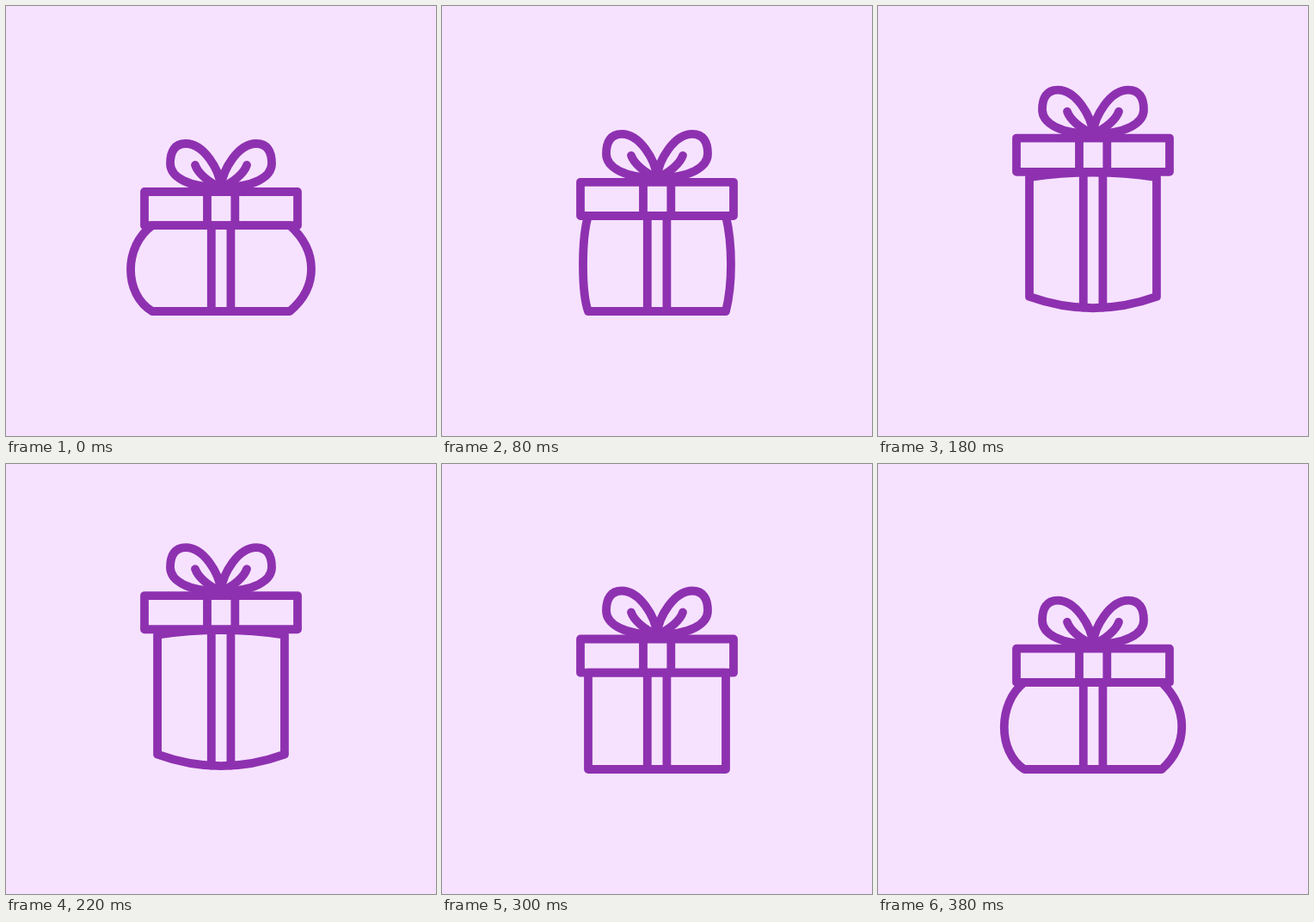
An HTML page with a canvas that plays this animation: 500x500 px, repeating every 400 ms.

```html
<!DOCTYPE html>
<html lang="en">
<head>
<meta charset="utf-8">
<title>Bouncing gift</title>
<style>
  html, body { margin: 0; width: 100%; height: 100%; overflow: hidden; background: #f6e2ff; }
  canvas { display: block; width: 500px; height: 500px; }
</style>
</head>
<body>
<canvas id="stage" width="500" height="500"></canvas>
<script>
const ctx = document.getElementById('stage').getContext('2d');
const LOOP = 400, STEP = 20, CENTER = 250;

// Cubic from 0 to 1 with the given slopes at its ends.
const ease = (t, a, b) =>
  a * t * (1 - t) ** 2 + t * t * (3 - 2 * t) + b * t * t * (t - 1);

// The gift goes squashed -> square -> stretched, then back the same way.
function poseAt(ms) {
  const rising = ms <= LOOP / 2;
  const phase = (rising ? ms : LOOP - ms) / (LOOP / 4);
  const release = Math.min(phase, 1);
  const reach = Math.max(phase - 1, 0);
  const stretch = ease(reach, rising ? 1.35 : 1.65, 0.31);
  return {
    bulge: 25 * (1 - ease(release, 0, 1.06)),
    stretch,
    lidTop: 216 - 12.5 * ease(release, 0, 0) - 55.5 * stretch
  };
}

function stroke(draw) {
  ctx.beginPath();
  draw();
  ctx.stroke();
}

function line(x1, y1, x2, y2) {
  stroke(() => {
    ctx.moveTo(x1, y1);
    ctx.lineTo(x2, y2);
  });
}

function drawBody({ bulge, stretch, lidTop }) {
  const lidBottom = lidTop + 39.2;
  const left = 170 + 6.7 * stretch, right = 500 - left;
  const top = lidBottom + 7 * stretch, topMid = lidBottom + stretch;
  const bottom = 355 - 19 * stretch, bottomMid = 355 - 4.2 * stretch;
  const out = bulge * 4 / 3, height = bottom - top;

  stroke(() => {
    ctx.moveTo(left, top);
    ctx.quadraticCurveTo(CENTER, 2 * topMid - top, right, top);
    ctx.bezierCurveTo(right + out, top + height * 0.3,
                      right + out, bottom - height * 0.28, right, bottom);
    ctx.quadraticCurveTo(CENTER, 2 * bottomMid - bottom, left, bottom);
    ctx.bezierCurveTo(left - out, bottom - height * 0.2,
                      left - out, top + height * 0.24, left, top);
    ctx.closePath();
  });
  line(238.8, topMid, 238.8, bottomMid - 0.5);
  line(261.4, topMid, 261.4, bottomMid - 0.5);
}

function drawLid() {
  ctx.strokeRect(161, 0, 178, 39.2);
  line(234, 0, 234, 39);
  line(266.3, 0, 266.3, 39);
}

function drawBowHalf(side) {
  ctx.save();
  ctx.translate(CENTER, 0);
  ctx.scale(side, 1);
  stroke(() => {
    ctx.moveTo(0, -6);
    ctx.bezierCurveTo(-2, -26, -20, -56, -41, -56);
    ctx.bezierCurveTo(-54, -56, -59, -47, -59, -33);
    ctx.bezierCurveTo(-59, -17, -38, -5, 0, -5);
  });
  stroke(() => {
    ctx.moveTo(-30, -31);
    ctx.bezierCurveTo(-27, -22, -15, -11, 0, -5);
  });
  ctx.restore();
}

function render(ms) {
  const pose = poseAt(ms);
  ctx.fillStyle = '#f6e2ff';
  ctx.fillRect(0, 0, 500, 500);
  ctx.strokeStyle = '#8e31b0';
  ctx.lineWidth = 9.8;
  ctx.lineCap = ctx.lineJoin = 'round';

  drawBody(pose);
  ctx.save();
  ctx.translate(0, pose.lidTop);
  drawLid();
  drawBowHalf(1);
  drawBowHalf(-1);
  ctx.restore();
}

let start;
function tick(now) {
  start ??= now;
  const ms = (now - start) % LOOP;
  render(Math.floor(ms / STEP) * STEP);
  requestAnimationFrame(tick);
}
render(0);
requestAnimationFrame(tick);
</script>
</body>
</html>
```
